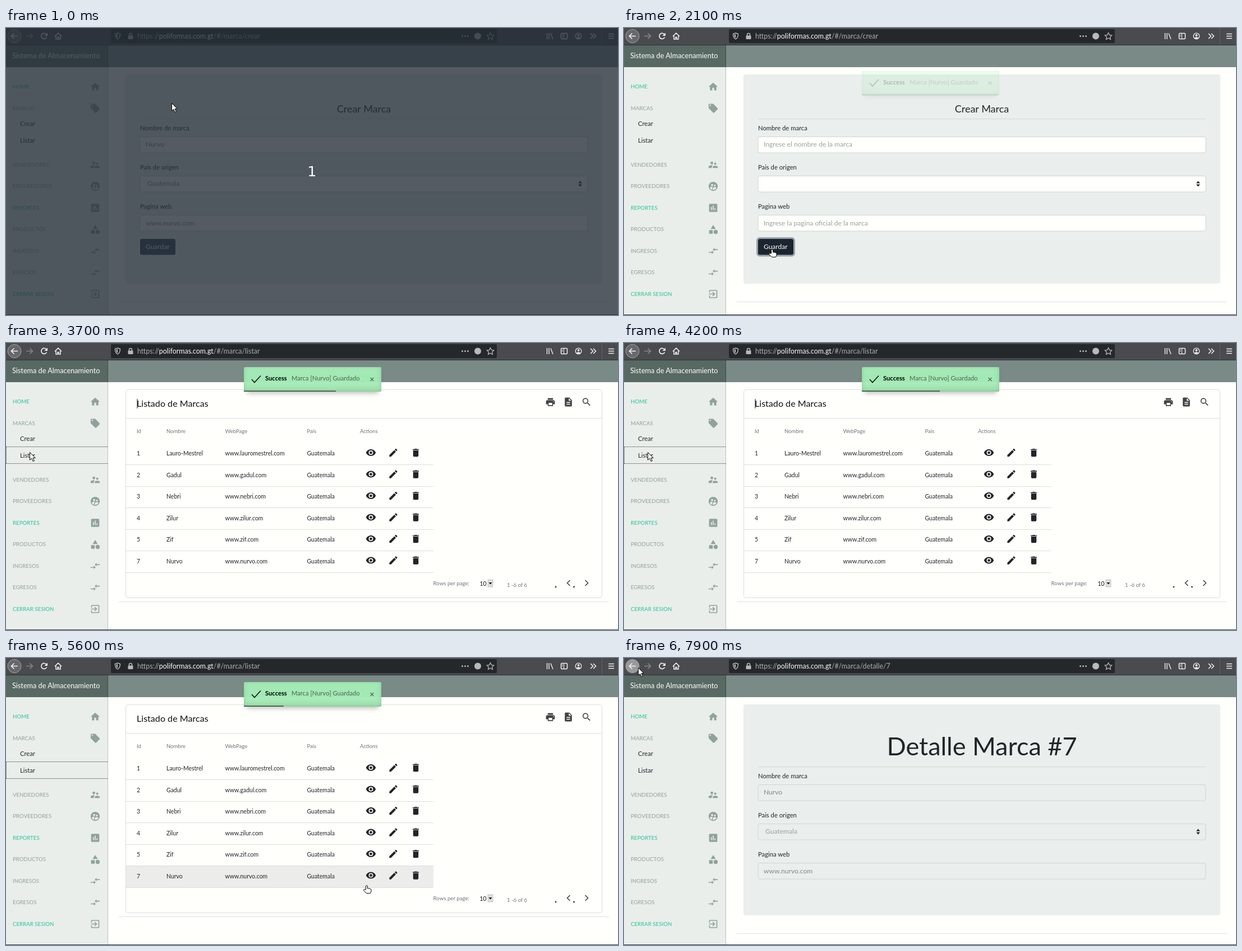
An HTML page for the animation above (8000 ms loop, 1091x513 px).

```html
<!DOCTYPE html>
<html lang="es">
<head>
<meta charset="utf-8">
<title>Sistema de Almacenamiento</title>
<style>
html, body { margin: 0; width: 100%; height: 100%; overflow: hidden; background: #fffffc; }
body { position: relative; font-family: Lato, sans-serif; }
svg { position: absolute; left: 0; top: 0; display: block; }
text { font-family: Lato, sans-serif; white-space: pre; }
#toast {
  position: absolute; left: 424px; top: 43px; width: 245px; height: 43.5px; border-radius: 2px;
  background: rgba(166, 239, 184, .95);
  box-shadow: inset 0 -10px 20px -10px rgba(0,0,0,.2), inset 0 0 5px rgba(0,0,0,.1), 0 8px 8px -5px rgba(0,0,0,.25);
}
#bar { position: absolute; left: 0; bottom: 0; height: 2px; background: rgba(0,0,0,.5); }
</style>
</head>
<body>
<svg id="page" width="1091" height="513"></svg>
<div id="toast"><svg id="note" width="245" height="44"></svg><div id="bar"></div></div>
<svg id="top" width="1091" height="513"></svg>
<script>
const $ = id => document.getElementById(id);
const INK = '#212529', MUTED = '#91a19d', GREEN = '#2ac198', LINE = '#d0d6d3', PANEL = '#eaeeec', PAPER = '#fffffc';
const BRAND = 'Nurvo';

// ---- drawing helpers ----
const text = (x, mid, size, str, fill = INK, extra = '') =>
  `<text x="${x}" y="${mid + size * .35}" font-size="${size}" fill="${fill}" ${extra}>${str}</text>`;
const rect = (x, y, w, h, fill, extra = '') =>
  `<rect x="${x}" y="${y}" width="${w}" height="${h}" fill="${fill}" ${extra}/>`;
const line = (d, stroke, width = 1, extra = '') =>
  `<path d="${d}" fill="none" stroke="${stroke}" stroke-width="${width}" ${extra}/>`;
const group = (id, body, extra = '') => `<g id="${id}" ${extra}>${body}</g>`;
const circle = (x, y, r, fill, extra = '') => `<circle cx="${x}" cy="${y}" r="${r}" fill="${fill}" ${extra}/>`;

const ICONS = {
  home: 'M10 20v-6h4v6h5v-8h3L12 3 2 12h3v8z',
  tag: 'M21.4 11.6l-9-9C12 2.2 11.5 2 11 2H4c-1.1 0-2 .9-2 2v7c0 .6.2 1 .6 1.4l9 9c.8.8 2 .8 2.8 0l7-7c.8-.8.8-2 0-2.8zM5.5 7a1.5 1.5 0 1 1 0-3 1.5 1.5 0 0 1 0 3z',
  people: 'M16.5 12a2.5 2.5 0 1 0 0-5 2.5 2.5 0 0 0 0 5zM9 11a3 3 0 1 0 0-6 3 3 0 0 0 0 6zm7.5 3c-1.8 0-5.5.9-5.5 2.75V19h11v-2.25c0-1.85-3.7-2.75-5.5-2.75zM9 13c-2.3 0-7 1.2-7 3.5V19h7v-2.25c0-.85.3-2.3 2.4-3.5C10.5 13.1 9.7 13 9 13z',
  team: 'M12 2a10 10 0 1 0 0 20 10 10 0 0 0 0-20zm3.6 6.3a1.95 1.95 0 1 1 0 3.9 1.95 1.95 0 0 1 0-3.9zm-6-1.5a2.35 2.35 0 1 1 0 4.7 2.35 2.35 0 0 1 0-4.7zm0 9.1v3.7c-2.4-.7-4.3-2.6-5.1-4.9 1-1.1 3.6-1.7 5.1-1.7.5 0 1.2.1 1.9.2-1.6.9-1.9 2-1.9 2.7zM12 20h-.8v-4.1c0-1.4 2.9-2.1 4.4-2.1 1.1 0 2.9.4 3.8 1.1A8 8 0 0 1 12 20z',
  chart: 'M19 3H5c-1.1 0-2 .9-2 2v14c0 1.1.9 2 2 2h14c1.1 0 2-.9 2-2V5c0-1.1-.9-2-2-2zM9 17H7v-7h2zm4 0h-2V7h2zm4 0h-2v-4h2z',
  shapes: 'M12 2L6.5 11h11zM17.5 13a4.5 4.5 0 1 0 0 9 4.5 4.5 0 0 0 0-9zM3 13.5h8v8H3z',
  swap: 'M9 14H2v2h7v3l4-4-4-4zm6-1v-3h7V8h-7V5l-4 4z',
  exit: 'M10.1 15.6L11.5 17l5-5-5-5-1.4 1.4 2.6 2.6H3v2h9.7zM19 3H5c-1.1 0-2 .9-2 2v4h2V5h14v14H5v-4H3v4c0 1.1.9 2 2 2h14c1.1 0 2-.9 2-2V5c0-1.1-.9-2-2-2z',
  print: 'M19 8H5c-1.7 0-3 1.3-3 3v6h4v4h12v-4h4v-6c0-1.7-1.3-3-3-3zm-3 11H8v-5h8zm3-7a1 1 0 1 1 0-2 1 1 0 0 1 0 2zM18 3H6v4h12z',
  doc: 'M14 2H6c-1.1 0-2 .9-2 2v16c0 1.1.9 2 2 2h12c1.1 0 2-.9 2-2V8zm2 16H8v-2h8zm0-4H8v-2h8zm-3-5V3.5L18.5 9z',
  search: 'M15.5 14h-.8l-.3-.3A6.5 6.5 0 1 0 13.7 14.4l.3.3v.8l5 5 1.5-1.5zm-6 0a4.5 4.5 0 1 1 0-9 4.5 4.5 0 0 1 0 9z',
  eye: 'M12 4.5C7 4.5 2.7 7.6 1 12c1.7 4.4 6 7.5 11 7.5s9.3-3.1 11-7.5c-1.7-4.4-6-7.5-11-7.5zM12 17a5 5 0 1 1 0-10 5 5 0 0 1 0 10zm0-8a3 3 0 1 0 0 6 3 3 0 0 0 0-6z',
  edit: 'M3 17.25V21h3.75L17.8 9.9l-3.7-3.7zM20.7 7c.4-.4.4-1 0-1.4l-2.3-2.3c-.4-.4-1-.4-1.4 0l-1.9 1.8 3.8 3.8z',
  bin: 'M6 19c0 1.1.9 2 2 2h8c1.1 0 2-.9 2-2V7H6zM19 4h-3.5l-1-1h-5l-1 1H5v2h14z'
};
const icon = (name, x, y, fill, size = 19) =>
  `<path d="${ICONS[name]}" fill="${fill}" fill-rule="evenodd" transform="translate(${x - size / 2} ${y - size / 2}) scale(${size / 24})"/>`;

// ---- browser bar ----
function browserBar() {
  const w = '#f0f0f0', g = '#b8b9bb';
  return rect(0, 0, 1091, 31, '#494b4e') + rect(0, 30, 1091, 1, '#303236') +
    circle(15, 14.5, 12, '#66686b', 'id="back" stroke="#a6a7a9"') +
    line('M21 14.5H10M14.5 9.5l-5 5 5 5', w, 1.7) +
    line('M36 14.5h11M42.500 9.500l5 5-5 5', '#85878a', 1.6) +
    line('M72.300 12A5 5 0 1 0 72.500 16.500', w, 1.7) + `<path d="M74 8.500v5.500h-5.500z" fill="${w}"/>` +
    line('M87 15l6-6 6 6M89 14v6h3v-3.500h2V20h3v-6', w, 1.5) +
    rect(187, 2, 688, 25, '#25282b', 'rx="2"') +
    line('M199 9l4.500 1.500c0 5-1 7.500-4.500 9.500c-3.500-2-4.500-4.500-4.500-9.500z', g, 1.4) + `<path d="M199 11v7c-2-1.500-2.500-3-2.500-6z" fill="${g}"/>` +
    rect(217.5, 13.5, 9, 6.5, g, 'rx="1"') + line('M219.500 14v-2a2.500 2.500 0 0 1 5 0v2', g, 1.5) +
    `<text x="234" y="18.500" font-size="12.4" fill="#a9abad">https://<tspan fill="#f9f9fa">poliformas.com.gt</tspan><tspan id="path"></tspan></text>` +
    [813.5, 818.5, 823.5].map(x => circle(x, 14.5, 1.5, g)).join('') +
    circle(841, 14.5, 6, g) +
    line('M863.500 8.500l1.900 4 4.300.6-3.100 3 .8 4.300-3.900-2.100-3.900 2.100.8-4.300-3.100-3 4.300-.6z', g, 1.3) +
    line('M964.500 9v11M968 9v11M971 9.500l4 10.500', w, 1.4) +
    rect(989.5, 9.5, 11, 10, 'none', `rx="1.500" stroke="${w}" stroke-width="1.5"`) + line('M994.500 10v9M991 12.500h2M991 15h2', w) +
    circle(1020.5, 14.5, 5.3, 'none', `stroke="${w}" stroke-width="1.3"`) + circle(1020.5, 13, 2, w) +
    `<path d="M1017 17.500q3.500-3 7 0q-3.500 3-7 0z" fill="${w}"/>` +
    line('M1042 10l4.500 4.500-4.500 4.500M1047 10l4.500 4.500-4.500 4.500', w, 1.5) +
    line('M1062.500 0v30', '#5f6164') + line('M1074 10.500h10M1074 14.500h10M1074 18.500h10', w, 1.4);
}

// ---- side menu ----
const MENU = [
  ['HOME', 105, 'home', 1], ['MARCAS', 143.5, 'tag'], ['VENDEDORES', 244.5, 'people'],
  ['PROVEEDORES', 283, 'team'], ['REPORTES', 321.5, 'chart', 1], ['PRODUCTOS', 360, 'shapes'],
  ['INGRESOS', 398.5, 'swap'], ['EGRESOS', 437, 'swap'], ['CERRAR SESION', 475.5, 'exit', 1]
];
const sideMenu = () =>
  rect(0, 31, 1091, 39, '#798a87') + rect(0, 31, 181, 39, '#586863') +
  rect(0, 70, 181, 443, '#e9eeeb') + line('M181.500 31v482', '#b9c2be') + line('M181.500 31v39', '#3f4c48') +
  text(11, 50, 12.7, 'Sistema de Almacenamiento', '#fff') +
  MENU.map(([name, y, ic, on]) => text(12, y, 9.7, name, on ? GREEN : MUTED) + icon(ic, 159, y, MUTED, 19.5)).join('') +
  text(25, 171, 11.2, 'Crear') + text(25, 201, 11.2, 'Listar') +
  group('focus', line('M0 185.500h181M0 215.500h181M.5 186v30', '#333', 1, 'stroke-dasharray="1 1"'));

// ---- pages ----
const field = (y, label, bg) =>
  text(239, y - 14.5, 11.25, label) + rect(239, y + .5, 798, 28.5, bg, `rx="3" stroke="${LINE}"`);
const fields = (y, bg) =>
  field(y, 'Nombre de marca', bg) + field(y + 70, 'Pais de origen', bg) + field(y + 140, 'Pagina web', bg) +
  `<path d="M1020 ${y + 83.500}l3.500-4 3.500 4zM1020 ${y + 85.500}l3.500 4 3.500-4z" fill="#222"/>`;
const values = (y, fill, mid = fill) =>
  text(249, y + 14, 12.1, BRAND, fill) + text(252, y + 84, 12.1, 'Guatemala', mid) +
  text(249, y + 154.5, 12.1, `www.${BRAND.toLowerCase()}.com`, fill);
const panel = h => rect(213, 83, 850, h, PANEL, 'rx="4"') + line(`M201 ${83 + h + 32.500}h874`, '#dfe3e0');
const title = (y, size, str) => text(638, y, size, str, INK, 'text-anchor="middle"');

const formPage = () => panel(374) + title(144.5, 18, 'Crear Marca') + line('M239 162.500h798', '#d3d8d5') +
  fields(194, PAPER) + group('filled', values(194, '#7b8a8b')) +
  group('blank', text(249, 208, 12.1, 'Ingrese el nombre de la marca', '#95a2a2') +
    text(249, 348.5, 12.1, 'Ingrese la pagina oficial de la marca', '#95a2a2')) +
  rect(237.5, 375.5, 66, 31.5, 'none', 'id="ring" rx="4.500" stroke="#99a3a8" stroke-width="3"') +
  rect(239, 377, 63, 28.5, '#2c3e50', 'id="save" rx="3"') + text(249, 390.5, 12, 'Guardar', '#fff');

const detailPage = () => panel(377) + title(158.5, 45, 'Detalle Marca #7') + line('M239 194.500h798', '#d3d8d5') +
  fields(226, PANEL) + values(226, '#7b8a8b', '#95a2a2') + rect(469, 138, 2, 46, '#111', 'id="caret2"');

const ROWS = [[1, 'Lauro-Mestrel'], [2, 'Gadul'], [3, 'Nebri'], [4, 'Zilur'], [5, 'Zif'], [7, BRAND]];
const STEP = 38.5, ROW0 = 179;
const COLS = [233, 286, 390.5, 536.5, 631];
const listPage = () => rect(213.5, 83.5, 849, 372, PAPER, 'rx="4" stroke="#dcdfdc"') +
  line('M214 134.500h848', '#dcdfdc') + line('M201 462.500h874', '#dfe3e0') +
  rect(214, 0, 548, STEP, '#ecedeb', 'id="hover"') +
  text(233, 108.5, 16.1, 'Listado de Marcas', '#111') + rect(233.5, 100, 1, 17, '#111', 'id="caret1"') +
  icon('print', 970.5, 105.5, '#444') + icon('doc', 1002.5, 105.5, '#444') + icon('search', 1035, 105.5, '#444') +
  ['Id', 'Nombre', 'WebPage', 'Pais', 'Actions'].map((h, i) => text(COLS[i], 157.5, 9.5, h, '#70757a')).join('') +
  ROWS.map(([id, name], i) => {
    const y = 197.5 + i * STEP, site = `www.${name.replace('-', '').toLowerCase()}.com`;
    return [id, name, site, 'Guatemala'].map((s, c) => text(COLS[c], y, 10.5, s)).join('') +
      ['eye', 'edit', 'bin'].map((n, k) => icon(n, 650.5 + 40 * k, y - 1.5, INK)).join('') +
      line(`M214 ${Math.floor(ROW0 + (i + 1) * STEP) + .5}h548`, '#dcdfdc');
  }).join('') +
  text(761.5, 430, 9.7, 'Rows per page:', '#70757a') + text(844.5, 430, 10.5, '10', '#111') +
  rect(859, 423, 9, 13, '#dedfdd', 'stroke="#aaa" stroke-width=".6"') + '<path d="M860.500 428h6l-3 3.500z" fill="#111"/>' +
  text(893, 433, 9.5, '1 -6 of 6', '#70757a') + circle(980, 436, 1.4, '#333') + circle(1012.5, 436, 1.4, '#333') +
  line('M1005.500 424l-5 5 5 5M1032.500 424l5 5-5 5', '#444', 1.6);

$('page').innerHTML = rect(0, 0, 1091, 513, PAPER) + group('form', formPage()) + group('list', listPage()) +
  group('detail', detailPage()) + sideMenu() + browserBar() + rect(0, 512, 1091, 1, '#3a3d40');

$('note').innerHTML = line('M14 22l5 5.500L30 15.500', '#111', 1.6) +
  text(38, 20.5, 11.2, 'Success', '#000', 'font-weight="700"') +
  text(85, 20.5, 11.2, `Marca [${BRAND}] Guardado`, '#4d6354') + line('M225.500 19l6 6M231.500 19l-6 6', '#4d6354', 1.1);

const HAND = 'M-1.500 8V1.500q1.500-2 3 0V6q1.500-1 2.500.3q1.500-.8 2.300.4q1.700-.2 1.700 1.500V11l-1.500 3.500h-7L-5.500 9.500q-.5-2 1.300-1.800z';
$('top').innerHTML = group('dim', rect(0, 0, 1091, 513, 'rgba(36,45,56,.78)') +
  `<text x="545.500" y="265" font-size="25" fill="#fff" text-anchor="middle" style="font-family:'DejaVu Sans',sans-serif">1</text>`) +
  group('cursor',
    `<path id="arrow" d="M.5 .5V14l3.200-2.800 2.400 5.300 2.300-1-2.400-5.200h4.300z" fill="#fff" stroke="#000"/>` +
    `<path id="hand" d="${HAND}" fill="#fff" stroke="#000"/>` +
    group('beam', line('M-4-6.500h3l1 1 1-1h3M-4 6.500h3l1-1 1 1h3M0-6v12', '#fff', 3.4) +
      line('M-4-6.500h3l1 1 1-1h3M-4 6.500h3l1-1 1 1h3M0-6v12', '#000', 1.5)));

// ---- timeline ----
const CURSOR = [ // time, x, y, shape from here on
  [0, 295, 134, 'arrow'], [300, 295, 134, 'arrow'], [800, 252, 421, 'arrow'], [900, 250, 415, 'arrow'],
  [1100, 258, 407, 'arrow'], [1200, 258, 407, 'arrow'], [1400, 264, 395, 'hand'], [2200, 264, 395, 'hand'],
  [2400, 240, 352, 'beam'], [2900, 133, 214, 'beam'], [3000, 133, 213, 'beam'], [3100, 122, 210, 'arrow'],
  [3500, 42, 195, 'arrow'], [4200, 42, 195, 'arrow'], [5100, 610, 424, 'arrow'], [5300, 632, 426, 'arrow'],
  [5600, 643, 406, 'hand'], [5900, 648, 394, 'hand'], [6500, 648, 394, 'hand'], [6800, 262, 293, 'hand'],
  [6900, 181, 206, 'hand'], [7000, 150, 165, 'arrow'], [7700, 23, 13, 'arrow'], [7900, 25, 17, 'arrow']
];
const SAVE = 1600, CLEARED = 2000, TOAST = 1980, LIST = 3700, DETAIL = 6400, BAR = [2045, 7045];
const clamp = v => Math.max(0, Math.min(1, v));
const show = (id, on) => { $(id).style.display = on ? '' : 'none'; };

function pointer(t) {
  let i = CURSOR.length - 1;
  while (CURSOR[i][0] > t) i--;
  const a = CURSOR[i], b = CURSOR[i + 1] || a;
  const k = b === a ? 0 : (t - a[0]) / (b[0] - a[0]);
  return { x: a[1] + (b[1] - a[1]) * k, y: a[2] + (b[2] - a[2]) * k, shape: a[3] };
}

// CSS "ease", solved by bisection
function ease(p) {
  const bez = (s, a, b) => 3 * s * (1 - s) ** 2 * a + 3 * s * s * (1 - s) * b + s ** 3;
  let lo = 0, hi = 1;
  for (let i = 0; i < 20; i++) {
    const m = (lo + hi) / 2;
    if (bez(m, .25, .25) < p) lo = m; else hi = m;
  }
  return bez(lo, .1, 1);
}

function draw(t) {
  const p = pointer(t), list = t >= LIST && t < DETAIL;
  show('dim', t < 100);
  show('form', t < LIST);
  show('list', list);
  show('detail', t >= DETAIL);
  show('filled', t < CLEARED);
  show('blank', t >= CLEARED);
  show('ring', t >= SAVE);
  show('focus', t >= LIST - 100 && t < DETAIL);
  show('caret1', (t - LIST) % 1200 < 600);
  show('caret2', t < 7000);
  $('path').textContent = '/#/marca/' + (t < LIST ? 'crear' : list ? 'listar' : 'detalle/7');

  const onSave = p.x > 239 && p.x < 302 && p.y > 377 && p.y < 405;
  $('save').setAttribute('fill', t >= SAVE ? '#1a252f' : onSave ? '#1e2b37' : '#2c3e50');
  const row = Math.floor((p.y - ROW0) / STEP);
  show('hover', p.x > 214 && p.x < 762 && row >= 0 && row < ROWS.length);
  $('hover').setAttribute('y', ROW0 + row * STEP);
  $('back').setAttribute('fill', Math.hypot(p.x - 15, p.y - 14.5) < 13 ? '#98999b' : '#66686b');

  const rise = ease(clamp((t - TOAST) / 700));
  show('toast', t > TOAST && t < 7550);
  $('toast').style.opacity = rise * (1 - ease(clamp((t - 7050) / 500)));
  $('toast').style.transform = `translateY(${(1 - rise) * 100}%)`;
  $('bar').style.width = 100 * (1 - clamp((t - BAR[0]) / (BAR[1] - BAR[0]))) + '%';

  for (const s of ['arrow', 'hand', 'beam']) show(s, s === p.shape);
  $('cursor').setAttribute('transform', `translate(${Math.round(p.x)} ${Math.round(p.y)})`);
}

const start = performance.now();
function tick() {
  draw(Math.floor((performance.now() - start) % 8000 / 100) * 100);
  requestAnimationFrame(tick);
}
tick();
</script>
</body>
</html>
```
